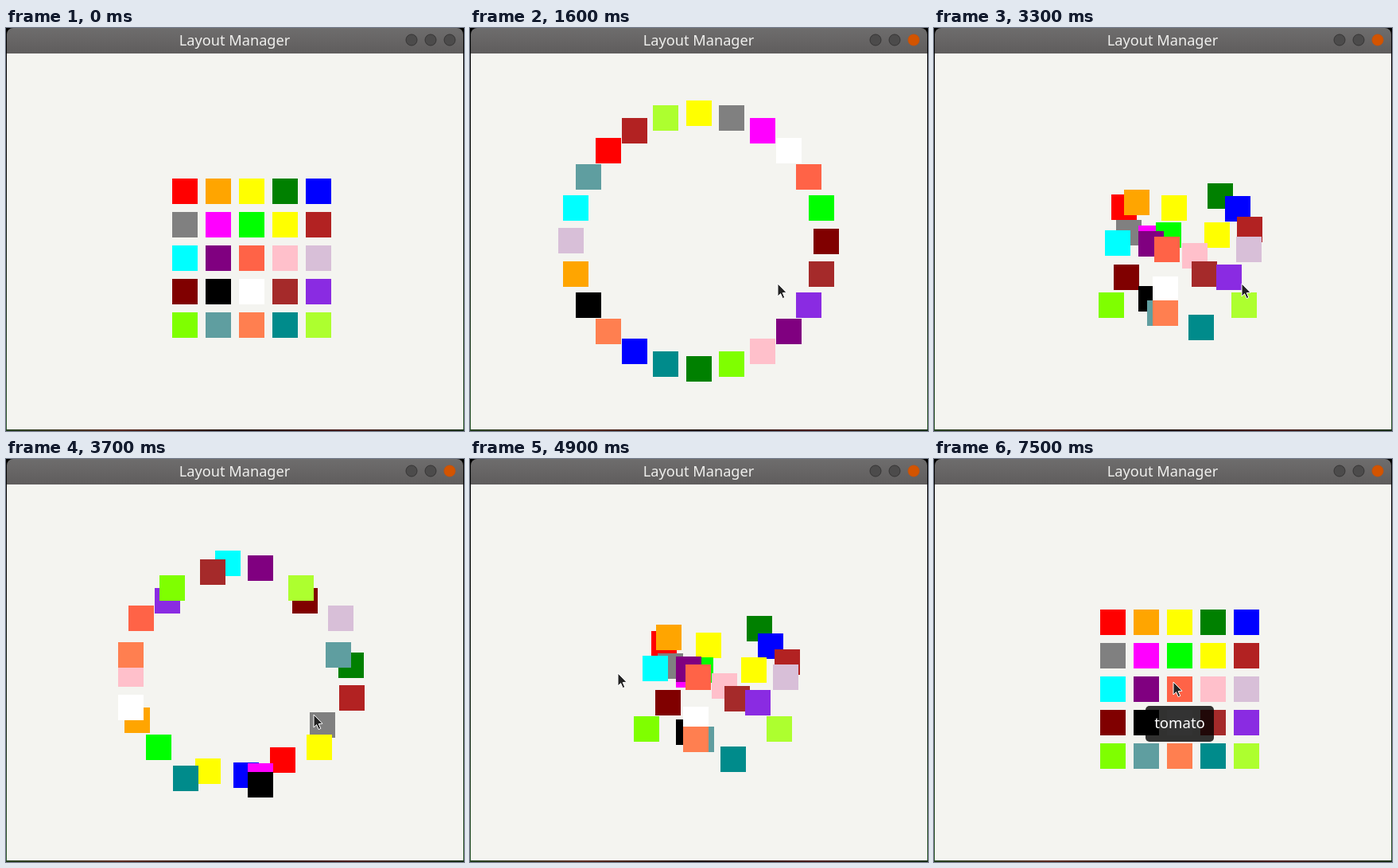
Recreate the animation shown at these times as an HTML page with a canvas. Size 576x506 px, loop 8 s.

```html
<!DOCTYPE html>
<html lang="en">
<head>
<meta charset="utf-8">
<title>Layout Manager</title>
<style>
  html, body { margin: 0; width: 100%; height: 100%; overflow: hidden; background: #000; }
  canvas { display: block; }
</style>
</head>
<body>
<canvas id="stage" width="576" height="506"></canvas>
<script>
const ctx = document.getElementById('stage').getContext('2d');
const LOOP = 8000, STEP = 100;
const CELL = 42, SIZE = 32, CX = 288, CY = 268;
const SLOTS = 24, RADIUS = SLOTS * CELL / (2 * Math.PI);

const colors = ('red orange yellow green blue grey magenta lime yellow firebrick ' +
  'aqua purple tomato pink thistle maroon black white brown blueviolet ' +
  'chartreuse cadetblue coral darkcyan greenyellow').split(' ');

// Each square's slot on the circle; the squares are shuffled between the two trips
const trips = [
  { out: 846, back: 1757, slots: [15, 19, 12, 0, 22, 11, 10, 7, 1, 14, 17, 3, 8, 2, 18, 6, 20, 9, 5, 4, 1, 16, 21, 23, 13] },
  { out: 3247.6, back: 4448, slots: [2, 20, 23, 6, 0, 4, 1, 21, 3, 5, 12, 11, 16, 18, 8, 9, 1, 19, 13, 15, 14, 7, 17, 22, 10] }
];
const TRIP_TIME = 524;

// The pointer rests between moves
const pointerStart = { x: 556, y: 12 };
const pointerMoves = [
  { from: 400, to: 800, x: 387, y: 321 },
  { from: 3800, to: 4100, x: 186, y: 269 },
  { from: 5000, to: 5200, x: 143, y: 236 },
  { from: 5200, to: 5500, x: 201, y: 243 },
  { from: 5800, to: 5900, x: 213, y: 242 },
  { from: 6800, to: 7300, x: 301, y: 280 }
];

const ramp = (t, from, to) => Math.min(1, Math.max(0, (t - from) / (to - from)));
const mix = (a, b, p) => a * (1 - p) + b * p;

function gradient(x, y, ...stops) {
  const g = ctx.createLinearGradient(0, 0, x, y);
  stops.forEach((c, i) => g.addColorStop(i / (stops.length - 1), c));
  return g;
}

function text(str, x, y, size, color) {
  ctx.font = size + 'px "Noto Sans", "Open Sans", sans-serif';
  ctx.textAlign = 'center';
  ctx.fillStyle = color;
  ctx.fillText(str, x, y);
}

function drawWindow(hot) {
  ctx.fillStyle = gradient(0, 506, '#000', '#050805', '#142814', '#2d5a2d');
  ctx.fillRect(0, 0, 576, 506);
  ctx.fillStyle = gradient(576, 0, '#24401f', '#5a2a20', '#1c1008', '#4a1c1c', '#183018');
  ctx.fillRect(0, 504, 576, 2);

  ctx.fillStyle = '#f4f4f0';
  ctx.fillRect(1, 32, 574, 472);
  ctx.fillStyle = gradient(0, 32, '#6e6d6d', '#5f5d5d');
  ctx.beginPath();
  ctx.roundRect(1, 0, 574, 32, [8, 8, 0, 0]);
  ctx.fill();
  text('Layout Manager', 287.5, 22, 18.2, '#eeeeec');

  for (const x of [510, 534, 558]) {
    const lit = hot && x === 558;
    ctx.beginPath();
    ctx.arc(x, 15, 7, 0, 7);
    ctx.fillStyle = lit ? '#d35400' : '#4c4b4b';
    ctx.fill();
    ctx.strokeStyle = lit ? '#c85208' : '#363535';
    ctx.lineWidth = 1;
    ctx.stroke();
  }
}

function drawSquares(t) {
  const { out, back, slots } = t < trips[1].out ? trips[0] : trips[1];
  const blend = ramp(t, out, out + TRIP_TIME) - ramp(t, back, back + TRIP_TIME);
  colors.forEach((color, i) => {
    const angle = slots[i] * 2 * Math.PI / SLOTS;
    const gridX = CX + (i % 5 - 1.5) * CELL;
    const gridY = CY + (Math.floor(i / 5) - 1.5) * CELL;
    const ringX = Math.floor(CX + Math.sin(angle) * RADIUS);
    const ringY = Math.floor(CY + Math.cos(angle) * RADIUS);
    const x = Math.floor(mix(gridX, ringX, blend));
    const y = Math.floor(mix(gridY, ringY, blend));
    ctx.fillStyle = color;
    ctx.fillRect(x - SIZE / 2, y - SIZE / 2, SIZE, SIZE);
  });
}

function drawTip(label, x, y, width) {
  ctx.fillStyle = 'rgba(0,0,0,.8)';
  ctx.beginPath();
  ctx.roundRect(x - width / 2, y, width, 45, 5);
  ctx.fill();
  text(label, x, y + 28, 18.6, '#fff');
}

function drawPointer(t) {
  let { x, y } = pointerStart;
  for (const m of pointerMoves) {
    const p = ramp(t, m.from, m.to);
    x = mix(x, m.x, p);
    y = mix(y, m.y, p);
  }
  ctx.save();
  ctx.translate(Math.round(x), Math.round(y));
  ctx.beginPath();
  [[0, 0], [0, 16], [3.6, 12.6], [6.2, 18.6], [8.8, 17.4], [6.2, 11.6], [11, 11.2]]
    .forEach(p => ctx.lineTo(...p));
  ctx.closePath();
  ctx.fillStyle = '#222';
  ctx.strokeStyle = '#fff';
  ctx.lineWidth = 1;
  ctx.fill();
  ctx.stroke();
  ctx.restore();
}

function draw(now) {
  const t = Math.floor(now % LOOP / STEP) * STEP;
  drawWindow(t >= 400);
  drawSquares(t);
  if (t >= 6400 && t < 6900) drawTip('grey', 225.5, 268, 61);
  if (t >= 7500) drawTip('tomato', 309, 310, 86);
  if (t >= 400) drawPointer(t);
}

const start = performance.now();
function tick() {
  draw(performance.now() - start);
  requestAnimationFrame(tick);
}
tick();
</script>
</body>
</html>
```
